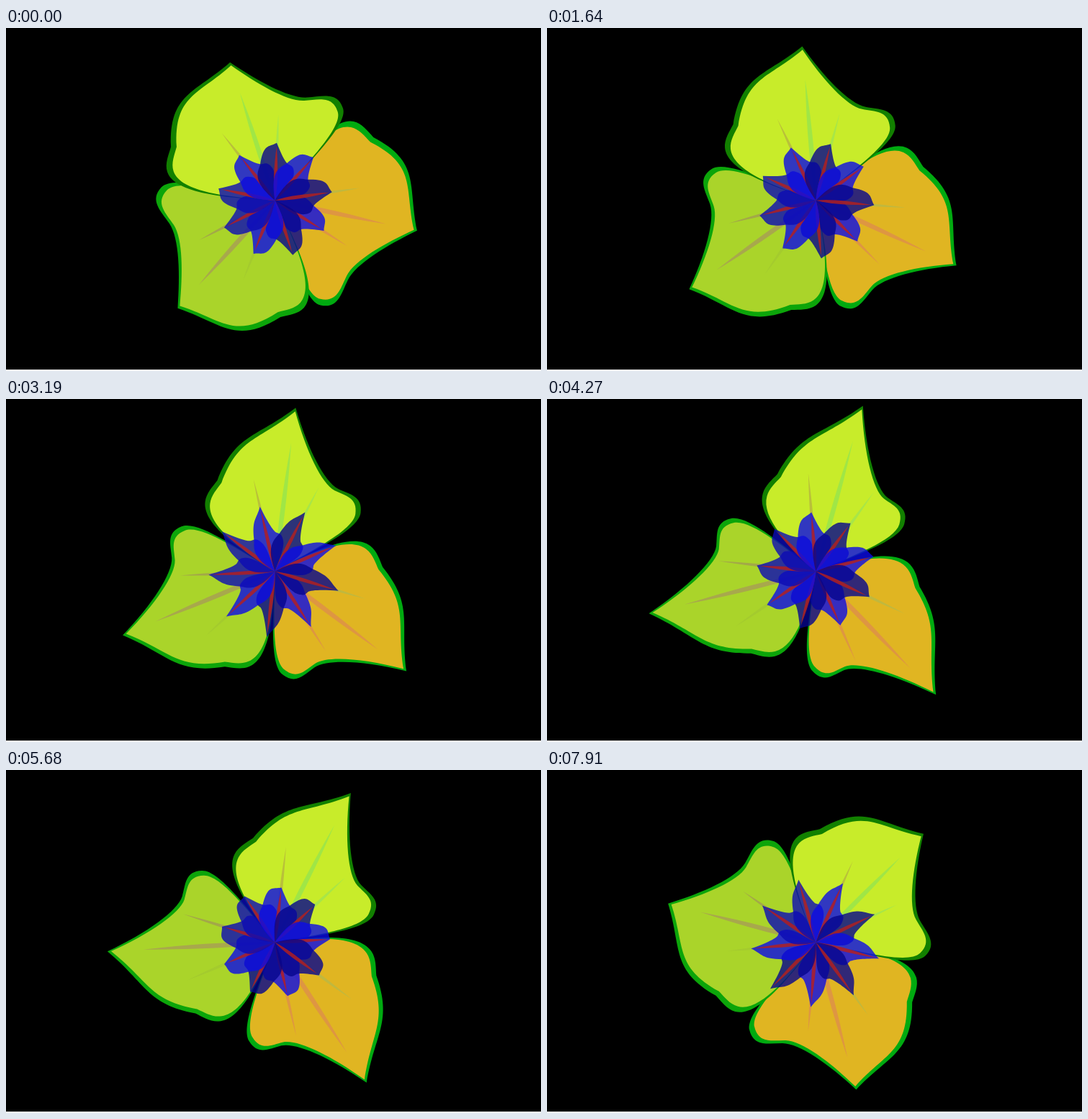
Write an HTML page with a canvas that moves like this. It is 743 px wide and 477 px high and loops after 8000 ms.

```html
<!DOCTYPE html>
<html lang="en">
<head>
<meta charset="utf-8">
<title>Turning flower</title>
<style>
  html, body { margin: 0; width: 100%; height: 100%; overflow: hidden; background: #fff; }
  canvas { display: block; width: 743px; height: 477px; }
</style>
</head>
<body>
<canvas id="stage" width="743" height="477"></canvas>
<script>
const ctx = document.getElementById('stage').getContext('2d');
const LOOP = 8000, STEP = 77.55, SPIN = 7.93;
const CENTER = [373.5, 239.7];

// Back to front; veins run left, middle, right.
const leaves = [
  { angle: 102, rim: '#00aa10', fill: '#e0b522', veins: ['#c0b83e', '#de9642', '#de9642'] },
  { angle: 222, rim: '#0ca50a', fill: '#aad42a', veins: ['#a4cb2e', '#a8a84c', '#a3a848'] },
  { angle: -18, rim: '#128000', fill: '#c8ec2a', veins: ['#b9c03a', '#a0e646', '#a8e648'] }
];

const BRIGHT = 'rgba(12,12,230,.8)', MIDDLE = 'rgba(12,12,180,.8)', DARK = 'rgba(6,6,140,.8)';
const starColors = [BRIGHT, DARK, BRIGHT, MIDDLE, MIDDLE, BRIGHT, DARK, BRIGHT, DARK];

// Triangle wave from 0 to 1 and back, one ramp per unit.
function triangle(x) {
  const m = ((x % 2) + 2) % 2;
  return m < 1 ? m : 2 - m;
}

// Outline with its tip up; `grow` pushes the tip outwards.
function petal(grow, scaleU, scaleV) {
  const path = new Path2D();
  const k = grow / 40.5;
  const curve = (...p) => path.bezierCurveTo(
    p[1] * scaleV, -p[0] * scaleU,
    p[3] * scaleV, -p[2] * scaleU,
    p[5] * scaleV, -p[4] * scaleU);
  path.moveTo(0, 0);
  curve(24, -62, 52, -128, 84, -128);
  curve(96, -128, 106, -119, 115.5, -112.6);
  curve(187 - 6 * k, -93, 176 + 7 * k, -58, 201 + grow, 0);
  curve(165 + 14 * k, 28, 128 + 6 * k, 62, 122 + 4 * k, 86);
  curve(117 + 3 * k, 106, 117 + 3 * k, 128, 92 + 5 * k, 127.5);
  curve(68 + 5 * k, 127, 36, 60, 0, 0);
  path.closePath();
  return path;
}

function rotated(degrees, draw) {
  ctx.save();
  ctx.rotate(degrees * Math.PI / 180);
  draw();
  ctx.restore();
}

function vein(length, width, color) {
  ctx.beginPath();
  ctx.moveTo(0, 0);
  ctx.quadraticCurveTo(width, -0.37 * length, 0, -length);
  ctx.quadraticCurveTo(-width, -0.37 * length, 0, 0);
  ctx.fillStyle = color;
  ctx.fill();
}

function fillPath(path, color) {
  ctx.fillStyle = color;
  ctx.fill(path);
}

function drawLeaves(turn, open) {
  const narrow = 1.02 - 0.255 * open;
  const outer = petal(41.5 * open, 1, narrow);
  const inner = petal(41.5 * open, 0.978, 0.935 * narrow);
  for (const leaf of leaves) {
    rotated(leaf.angle + turn, () => {
      fillPath(outer, leaf.rim);
      fillPath(inner, leaf.fill);
      leaf.veins.forEach((color, i) => {
        const middle = i === 1;
        const length = middle ? 157 + 34 * open : 119 + 19 * open;
        rotated((i - 1) * 20.3, () => vein(length, middle ? 6.5 : 4.5, color));
      });
    });
  }
}

function drawStar(turn, open) {
  const shape = petal(48.6 * open - 26.5, 0.42, 0.215 * (1 - 0.255 * open));
  const length = 0.95 * (73.3 + 20.4 * open);
  starColors.forEach((color, i) => {
    rotated(121.8 + i * 40 + turn, () => {
      fillPath(shape, color);
      vein(length, 5, 'rgba(185,32,25,.8)');
    });
  });
}

function render(now) {
  const t = Math.floor((now % LOOP + 4) / STEP) * STEP / 1000;
  const turn = SPIN * t;
  ctx.fillStyle = '#fff';
  ctx.fillRect(0, 0, 743, 477);
  ctx.fillStyle = '#000';
  ctx.fillRect(0, 0, 743, 475);
  ctx.save();
  ctx.translate(...CENTER);
  drawLeaves(turn, triangle((t - 0.09) / 4.53));
  drawStar(turn, triangle((t - 0.753) / 2.265));
  ctx.restore();
}

let start;
function tick(now) {
  start ??= now;
  render(now - start);
  requestAnimationFrame(tick);
}
render(0);
requestAnimationFrame(tick);
</script>
</body>
</html>
```
